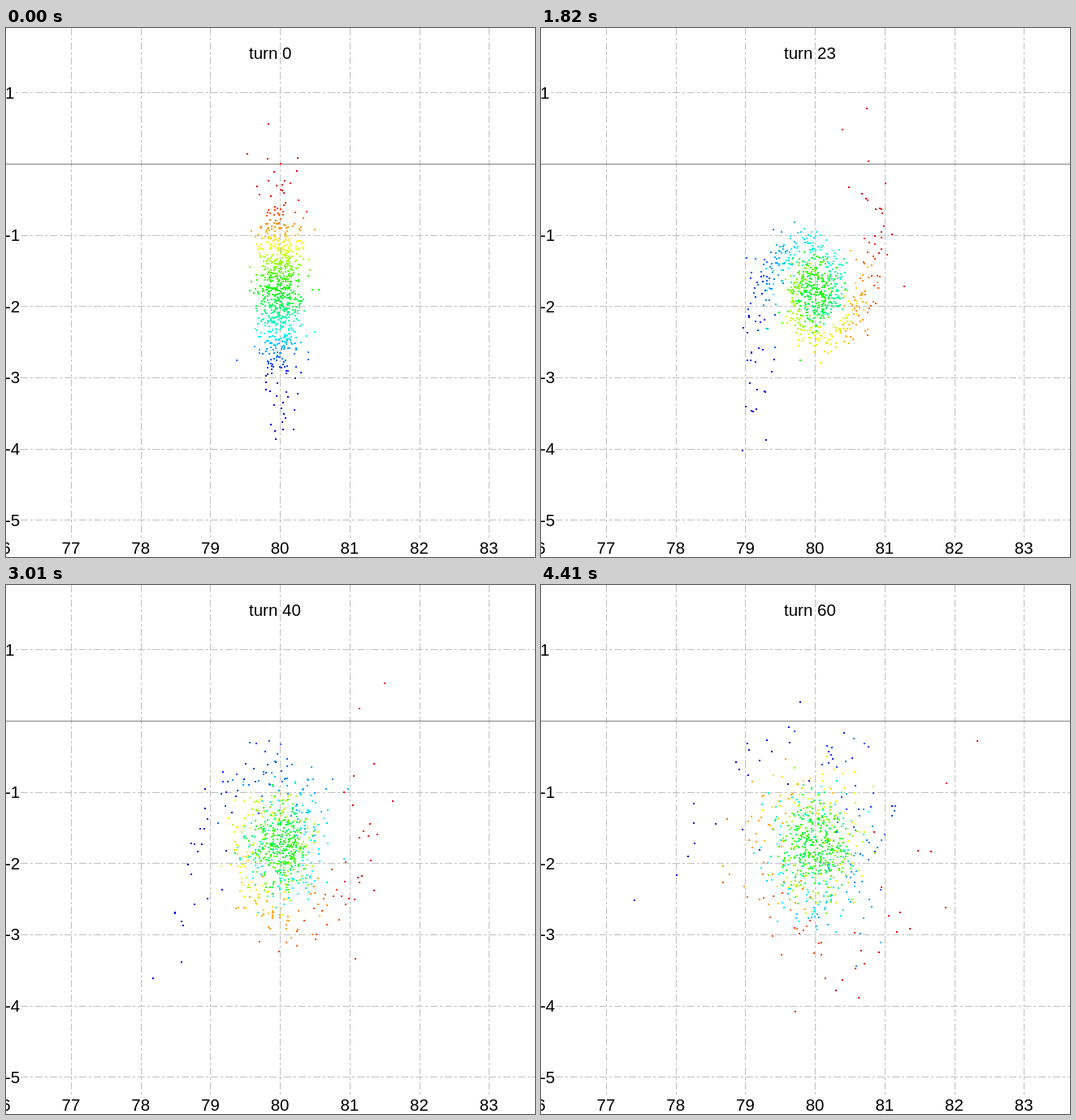
An HTML page with a canvas for the animation above (4760 ms loop, 651x651 px).

```html
<!DOCTYPE html>
<html lang="en">
<head>
<meta charset="utf-8">
<title>Bunch by turn</title>
<style>
html, body { margin: 0; width: 651px; height: 651px; overflow: hidden; background: #fff; }
canvas { display: block; }
</style>
</head>
<body>
<canvas id="stage" width="651" height="651"></canvas>
<script>
const SIZE = 651, LOOP = 4760, HOLD = 280, STEP = 70, TURNS = 60;
const COUNT = 760, CX = 80, CY = -1.77, ASPECT = 0.7;
const FONT = '20.5px "Liberation Sans", Arial, sans-serif';
const ctx = document.getElementById('stage').getContext('2d');

const px = x => 337.1 + (x - 80) * 85.7;
const py = y => 167.5 - y * 87.65;

let seed = 80;
function random() {
  seed = (seed + 0x6D2B79F5) | 0;
  let t = Math.imul(seed ^ (seed >>> 15), 1 | seed);
  t = (t + Math.imul(t ^ (t >>> 7), 61 | t)) ^ t;
  return ((t ^ (t >>> 14)) >>> 0) / 4294967296;
}
const gauss = () => Math.sqrt(-2 * Math.log(1 - random())) * Math.cos(2 * Math.PI * random());

// The few lone particles at the rim of the bunch
const rim = [[79.83, .56], [79.53, .14], [80.25, .08], [80.05, -3.73], [80.2, -3.72], [80.03, -3.62],
  [79.38, -2.75], [80.46, -1.76], [80.56, -1.76], [80.5, -.92]];

function makeParticle(_, i) {
  const [x, y] = rim[i] || [CX + 0.16 * gauss(), CY + 0.62 * gauss()];
  const u = (x - CX) / ASPECT, v = y - CY;
  const radius = Math.hypot(u, v);
  const hue = Math.max(0, Math.min(240, (-0.5 - y) * 96));
  return {
    radius,
    angle: Math.atan2(u, v),
    // Degrees per turn: the inner part winds up faster
    speed: 4.3 / (radius ** 2 + 0.1) ** 0.75 * (1 + 0.1 * gauss()),
    growth: 0.18 + 0.22 * gauss(),
    dx: 0.16 * gauss(),
    dy: 0.16 * gauss(),
    color: `hsl(${hue.toFixed()}, 100%, ${hue % 240 ? 50 : 46}%)`
  };
}
const particles = Array.from({ length: COUNT }, makeParticle);

function drawParticle(p, turn) {
  const age = turn / TURNS;
  const angle = p.angle + p.speed * turn * Math.PI / 180;
  const radius = p.radius * (1 + p.growth * age);
  const x = CX + ASPECT * radius * Math.sin(angle) + p.dx * age;
  const y = CY + radius * Math.cos(angle) + p.dy * age;
  ctx.fillStyle = p.color;
  ctx.fillRect(Math.round(px(x)) - 1, Math.round(py(y)) - 1, 2, 2);
}

function line(x1, y1, x2, y2) {
  ctx.beginPath();
  ctx.moveTo(x1, y1);
  ctx.lineTo(x2, y2);
  ctx.stroke();
}

function label(text, x, y) {
  ctx.fillStyle = '#fff';
  ctx.fillRect(x, y - 11, ctx.measureText(text).width, 22);
  ctx.fillStyle = '#000';
  ctx.fillText(text, x, y + 7);
}

function drawGrid() {
  ctx.fillStyle = '#fff';
  ctx.fillRect(0, 0, SIZE, SIZE);
  ctx.font = FONT;
  ctx.lineWidth = 1;
  ctx.strokeStyle = '#c0c0c0';
  ctx.setLineDash([9, 3, 3, 3]);
  for (let x = 77; x <= 83; x++) {
    const p = Math.round(px(x)) + 0.5;
    line(p, 0, p, SIZE);
  }
  for (let y = -5; y <= 1; y++) {
    const p = Math.floor(py(y)) + 0.5;
    if (y) line(0, p, SIZE, p);
  }
  ctx.setLineDash([]);
  ctx.strokeStyle = '#808080';
  line(0, 167.5, SIZE, 167.5);
  for (let x = 76; x <= 83; x++) label(x, px(x) - 11.4, 640);
  for (let y = -5; y <= 1; y++) if (y) label(y, -1, py(y));
}

function draw(now) {
  const t = now % LOOP;
  const turn = t < HOLD ? 0 : Math.min(TURNS, 1 + Math.floor((t - HOLD) / STEP));
  drawGrid();
  ctx.fillStyle = '#000';
  ctx.fillText('turn ' + turn, 299, 38);
  for (const p of particles) drawParticle(p, turn);
}

const start = performance.now();
function tick() {
  draw(performance.now() - start);
  requestAnimationFrame(tick);
}
tick();
</script>
</body>
</html>
```
